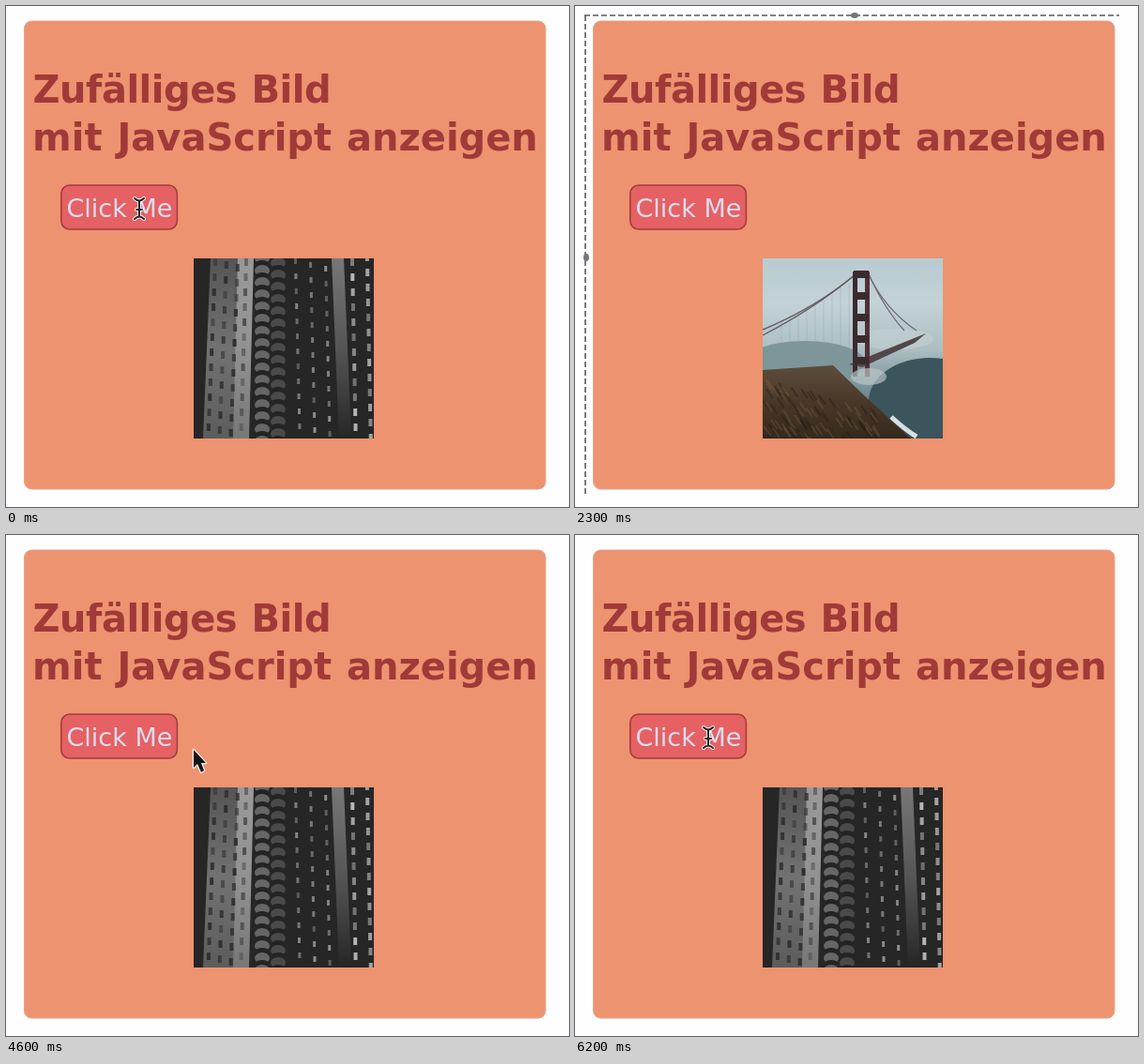
An HTML page with a canvas for the animation above (6.3 s loop, 600x534 px).

```html
<!DOCTYPE html>
<html lang="de">
<head>
<meta charset="utf-8">
<title>Zufälliges Bild</title>
<style>
html, body { margin: 0; width: 100%; height: 100%; overflow: hidden; background: #fefdff; }
canvas { display: block; width: 600px; height: 534px; }
</style>
</head>
<body>
<canvas id="stage" width="600" height="534"></canvas>
<script>
const LOOP = 6300, STEP = 100, SIZE = 192;
const ctx = document.getElementById('stage').getContext('2d');

function seeded(seed) {
  return () => (seed = (seed * 16807) % 2147483647) / 2147483647;
}

function repeat(n, fn) {
  for (let i = 0; i < n; i++) fn(i);
}

function poly(g, fill, ...pts) {
  g.fillStyle = fill;
  g.beginPath();
  pts.forEach(p => g.lineTo(...p));
  g.fill();
}

function line(g, color, width, x1, y1, x2, y2, cx = (x1 + x2) / 2, cy = (y1 + y2) / 2) {
  g.strokeStyle = color;
  g.lineWidth = width;
  g.beginPath();
  g.moveTo(x1, y1);
  g.quadraticCurveTo(cx, cy, x2, y2);
  g.stroke();
}

function oval(g, fill, x, y, rx, ry = rx) {
  g.fillStyle = fill;
  g.beginPath();
  g.ellipse(x, y, rx, ry, 0, 0, 7);
  g.fill();
}

function box(g, fill, x, y, w, h) {
  g.fillStyle = fill;
  g.fillRect(x, y, w, h);
}

// Vertical gradient with evenly spaced colours.
function ramp(g, top, bottom, ...colors) {
  const grad = g.createLinearGradient(0, top, 0, bottom);
  colors.forEach((c, i) => grad.addColorStop(i / (colors.length - 1), c));
  return grad;
}

// Paints a scene once and softens it like a photo.
function picture(seed, draw) {
  const c = document.createElement('canvas');
  c.width = c.height = SIZE;
  const g = c.getContext('2d');
  draw(g, seeded(seed));
  g.filter = 'blur(0.7px)';
  g.drawImage(c, 0, 0);
  return c;
}

const building = picture(17, (g, rnd) => {
  const wall = (fill, top, foot, w) =>
    poly(g, fill, [top, 0], [top + w, 0], [foot + w, SIZE], [foot, SIZE]);
  const windows = (x, cols, gap, lean, slope, color, w, h) =>
    repeat(cols, col => repeat(13, row => {
      const y = row * 16 + col * slope;
      g.globalAlpha = 0.5 + rnd() * 0.5;
      box(g, color, x + col * gap + y * lean, y, w, h);
      g.globalAlpha = 1;
    }));

  box(g, '#262626', 0, 0, SIZE, SIZE);
  wall(ramp(g, 0, SIZE, '#555', '#727272', '#5c5c5c'), 18, 10, 44);
  wall(ramp(g, 0, SIZE, '#999', '#929292', '#777'), 47, 42, 17);
  windows(21, 3, 12, -0.04, 3, '#2e2e2e', 4, 8);
  windows(54, 1, 0, -0.03, 0, '#4a4a4a', 4, 8);
  repeat(2, col => repeat(16, row => {
    const x = 73 + col * 17, y = row * 13 + col * 5;
    oval(g, col ? '#4a4a4a' : '#666', x, y, 8, 6);
    oval(g, '#242424', x, y + 5, 7, 3);
  }));
  windows(107, 3, 16, 0.025, 4, '#909090', 3, 6);
  wall(ramp(g, 0, SIZE, '#777', '#555', '#262626'), 147, 155, 13);
  windows(167, 2, 16, 0.02, -5, '#b8b8b8', 4, 8);
});

const meadow = picture(83, (g, rnd) => {
  box(g, ramp(g, 0, 82, '#a6bdc7', '#c2d3da', '#f4f7f6', '#fff', '#e3e7e1'), 0, 0, SIZE, 84);
  repeat(6, i => oval(g, '#8ba6b255', rnd() * SIZE, 8 + i * 5, 30 + rnd() * 35, 3));
  oval(g, '#ffffffaa', 105, 57, 70, 13);
  box(g, ramp(g, 79, SIZE, '#777d59', '#404a26', '#303a1b', '#1c2611', '#18200f'), 0, 79, SIZE, 113);
  repeat(210, i => {
    const x = rnd() * SIZE, y = 90 + rnd() * 110;
    line(g, i % 2 ? '#4c582c80' : '#151e0d99', 1 + rnd(), x, y, x + rnd() * 10 - 5, y - 10 - rnd() * 22);
  });
  repeat(85, () => {
    const depth = rnd() ** 2;
    oval(g, '#bebba299', rnd() * SIZE, 83 + depth * 48, 1 + depth * 5);
  });
  oval(g, '#c9c6b0cc', 63, 131, 11);
  oval(g, '#989273aa', 63, 132, 4);
});

const bridge = picture(41, (g, rnd) => {
  box(g, ramp(g, 0, SIZE, '#b8cbd1', '#c3d2d6', '#adbfc3', '#718a91', '#405b63'), 0, 0, SIZE, SIZE);
  oval(g, '#7e9699', 45, 112, 65, 24);
  oval(g, '#3c555d', 178, 152, 65, 46);
  oval(g, '#c2d0d1aa', 140, 86, 42, 11);
  repeat(9, i => line(g, '#8b9fa555', 1, 20 + i * 9, 66 - i * 5, 20 + i * 9, 96));
  repeat(2, i => {
    line(g, '#625c61', 1.4, 0, 76 + i * 6, 99, 17, 56, 53);
    line(g, '#6e696d', 1.2, 113, 17, 164 - i * 13, 77, 130, 54);
  });
  poly(g, '#51474b', [92, 113], [174, 80], [162, 90], [106, 116]);
  box(g, '#3b2a2e', 96, 14, 5, 112);
  box(g, '#4e3135', 109, 14, 5, 112);
  repeat(5, i => box(g, '#3b2a2e', 97, 13 + i * 23, 16, 8));
  oval(g, '#bdc8c8aa', 113, 126, 19, 9);
  poly(g, ramp(g, 113, SIZE, '#5d4e3d', '#493827', '#35291f'),
    [0, 119], [75, 114], [107, 145], [158, SIZE], [0, SIZE]);
  repeat(130, i => {
    const x = rnd() * 122, y = 126 + x * 0.28 + rnd() * 65;
    line(g, i % 2 ? '#80614055' : '#261d1877', 2, x, y, x + 7, y + 10);
  });
  line(g, '#d7e0df', 5, 137, 169, 164, 190, 151, 182);
});

const forest = picture(29, (g, rnd) => {
  box(g, ramp(g, 0, SIZE, '#302b2a', '#363029', '#3d3b24', '#30301f', '#242018'), 0, 0, SIZE, SIZE);
  oval(g, '#62583d77', 101, 82, 23, 32);
  oval(g, '#a69968', 100, 94, 14, 11);
  repeat(38, i => {
    const x = i * 5.2 + rnd() * 4, near = Math.abs(x - 102) / 100;
    if (near > 0.14)
      line(g, i % 3 ? '#1c1919' : '#48403a', 1.5 + near * 5 * rnd(), x + (rnd() - 0.4) * 9, 0, x, 98 + near * 24);
  });
  box(g, '#171515', 115, 0, 15, 108);
  box(g, '#191716', 176, 0, 12, 123);
  oval(g, '#45472688', 96, 133, 110, 28);
  g.lineCap = 'round';
  line(g, '#706c4b', 4, 111, 105, 53, 116, 58, 107);
  line(g, '#898567', 5, 53, 117, 151, 128, 75, 126);
  line(g, '#b2ac86', 4, 130, 125, 170, 134, 169, 126);
  line(g, '#5d5847', 5, 170, 134, 0, 148, 150, 144);
  line(g, '#211d17', 3, 165, 139, 0, 153, 110, 149);
  repeat(150, i => {
    const x = rnd() * SIZE, y = 154 + rnd() * 38;
    line(g, i % 2 ? '#514c2f66' : '#17151166', 1.5, x, y, x + 6, y - 2);
  });
});

function shotAt(t) {
  if (t < 600 || t >= 6200) return building;
  if (t < 1400) return meadow;
  if (t < 3200) return bridge;
  return t < 5200 ? building : forest;
}

// Smooth progress from 0 to 1 between two times.
function ease(t, from, to) {
  const k = Math.min(1, Math.max(0, (t - from) / (to - from)));
  return k * k * (3 - 2 * k);
}

// The pointer leaves the button downwards, rests beside it, then returns.
function pointer(t) {
  const away = ease(t, 1700, 2300), rest = ease(t, 3300, 4100), back = ease(t, 4600, 5000);
  return [142 + 188 * away - 130 * rest - 58 * back, 216 + 344 * away - 331 * rest - 13 * back];
}

function drawCursor(x, y) {
  ctx.save();
  ctx.translate(x, y);
  ctx.lineJoin = ctx.lineCap = 'round';
  if (x > 65 && x < 175 && y > 195 && y < 235) {
    for (const [color, w] of [['#f4f1f4', 4], ['#252326', 2]]) {
      line(ctx, color, w, 0, -8, 0, 8);
      line(ctx, color, w, -3, 1, 3, 1);
      for (const s of [-1, 1]) line(ctx, color, w, -5, 11 * s, 5, 11 * s, 0, 6 * s);
    }
  } else {
    const arrow = new Path2D('M0 0V19L4 15L8 24L11 22L8 14H13Z');
    ctx.strokeStyle = '#f5eeee';
    ctx.lineWidth = 2.5;
    ctx.stroke(arrow);
    ctx.fillStyle = '#171516';
    ctx.fill(arrow);
  }
  ctx.restore();
}

function panel(x, y, w, h, r, fill, edge, lw) {
  ctx.beginPath();
  ctx.roundRect(x, y, w, h, r);
  ctx.fillStyle = fill;
  ctx.fill();
  ctx.strokeStyle = edge;
  ctx.lineWidth = lw;
  ctx.stroke();
}

function text(str, x, y, font, color, tracking = 0, wordGap = 0) {
  ctx.font = font + ' "DejaVu Sans", sans-serif';
  ctx.letterSpacing = tracking + 'px';
  ctx.wordSpacing = wordGap + 'px';
  ctx.fillStyle = color;
  ctx.fillText(str, x, y);
}

function selection() {
  ctx.setLineDash([6, 3]);
  line(ctx, '#5b585b', 1.6, 10, 10, 580, 10);
  line(ctx, '#5b585b', 1.6, 11, 10, 11, 521);
  ctx.setLineDash([]);
  oval(ctx, '#777477', 298, 10, 4, 3);
  oval(ctx, '#777477', 12, 268, 3, 4);
}

function render(t) {
  box(ctx, '#fefdff', 0, 0, 600, 534);
  panel(19.5, 16, 555.5, 499, 8, '#ed9370', '#e5a48b', 1);
  text('Zufälliges Bild', 28.5, 103, 'bold 40px', '#a03a38', -0.5, 2);
  text('mit JavaScript anzeigen', 28, 154, 'bold 40px', '#a03a38', 0, 2);
  panel(58.8, 191, 123.6, 47, 9, '#e56163', '#a53d3b', 1.6);
  text('Click Me', 64.5, 225, '27px', '#dfdcef');
  ctx.drawImage(shotAt(t), 200, 269);
  if (t >= 2300 && t < 3200) selection();
  drawCursor(...pointer(t));
}

function tick() {
  render(Math.floor(performance.now() % LOOP / STEP) * STEP);
  requestAnimationFrame(tick);
}
tick();
</script>
</body>
</html>
```
